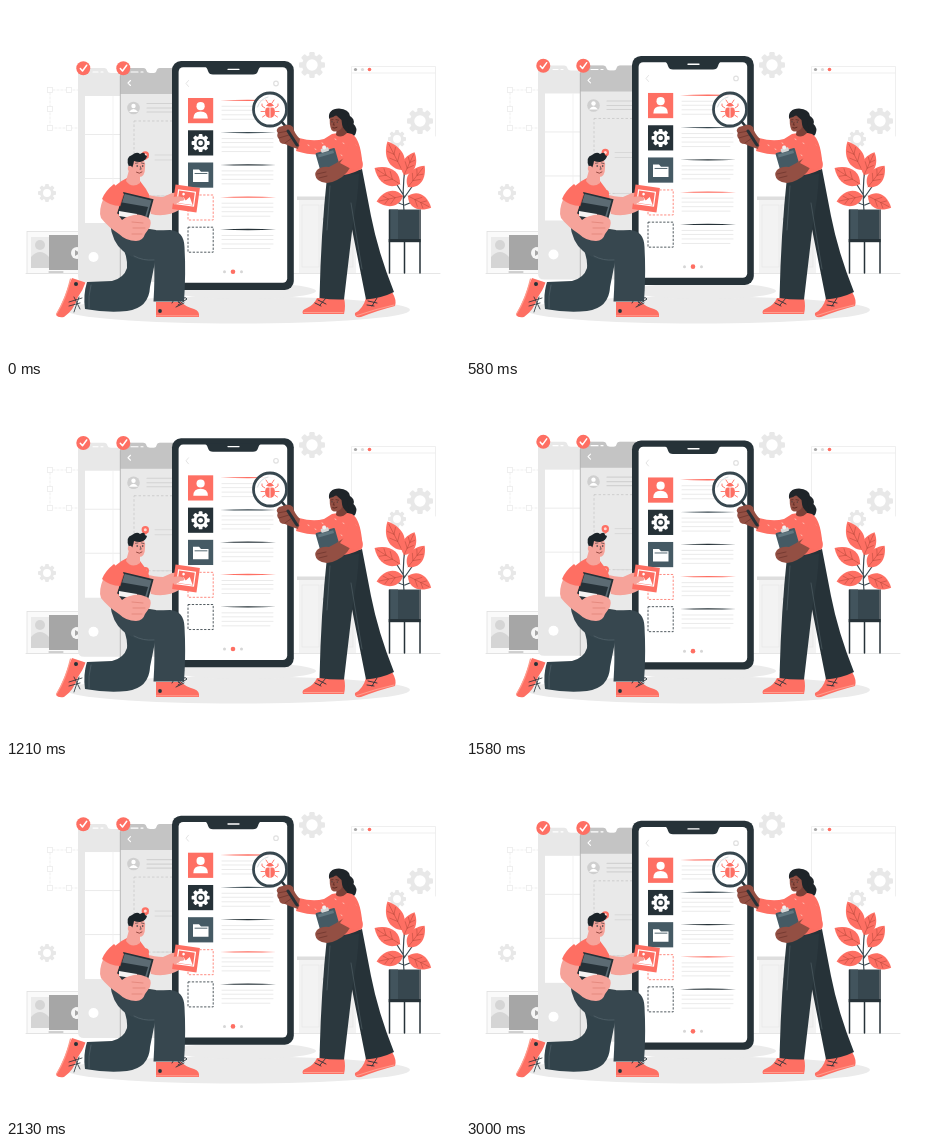
An HTML page that plays this animation: 454x352 px, repeating every 3.04 s.

```html
<!DOCTYPE html>
<html lang="en">
<head>
<meta charset="utf-8">
<title>App testing</title>
<style>
  html, body { margin: 0; width: 100%; height: 100%; overflow: hidden; background: #fff; }
  svg { display: block; width: 454px; height: 352px; }
  .line { fill: none; stroke-linecap: round; stroke-linejoin: round; }
</style>
</head>
<body>
<svg id="stage" viewBox="0 0 454 352" xmlns="http://www.w3.org/2000/svg"></svg>
<script>
const RED = '#fe6f63', DARK = '#263238', TEAL = '#455a64', PANTS = '#37474f';
const SKIN = '#f6a39a', BROWN = '#934f43', PALE = '#ebebeb', MID = '#e0e0e0';
const LOOP = 3040, TRAVEL = 6.6;

const path = (d, fill, extra = '') => `<path d="${d}" fill="${fill}" ${extra}/>`;
const line = (d, color, width = 1, extra = '') =>
  `<path class="line" d="${d}" stroke="${color}" stroke-width="${width}" ${extra}/>`;
const rect = (x, y, w, h, fill, extra = '') =>
  `<rect x="${x}" y="${y}" width="${w}" height="${h}" fill="${fill}" ${extra}/>`;
const dot = (x, y, r, fill, extra = '') => `<circle cx="${x}" cy="${y}" r="${r}" fill="${fill}" ${extra}/>`;
const oval = (x, y, rx, ry, fill, extra = '') =>
  `<ellipse cx="${x}" cy="${y}" rx="${rx}" ry="${ry}" fill="${fill}" ${extra}/>`;
const group = (content, extra = '') => `<g ${extra}>${content}</g>`;

function gear(x, y, r, fill, hole = '#fff') {
  let teeth = '';
  for (let a = 0; a < 360; a += 45)
    teeth += rect(x - r * .21, y - r, r * .42, r, fill, `rx="${r * .1}" transform="rotate(${a} ${x} ${y})"`);
  return teeth + dot(x, y, r * .77, fill) + dot(x, y, r * .44, hole);
}

function background() {
  const handles = [[44, 84], [63, 84], [44, 103], [44, 122], [63, 122]]
    .map(([x, y]) => rect(x - 2.5, y - 2.5, 5, 5, '#fff', `stroke="${PALE}" stroke-width=".8"`)).join('');
  return line('M73 84H44V122H73', PALE, .8, 'stroke-dasharray="2 2"') + handles
    + line('M345.5 130V60.5H429.5V130M345.5 67H429.5', PALE, .8)
    + gear(41, 187, 9, '#e8e8e8') + gear(306, 59, 13, '#e8e8e8')
    + gear(414, 115, 13, '#e8e8e8') + gear(391, 133, 9, '#e8e8e8')
    + dot(349.5, 63.5, 1.6, '#a6a6a6') + dot(356.5, 63.5, 1.6, '#dcdcdc') + dot(363.5, 63.5, 1.8, RED)
    + line('M20 267.5H434', MID, .8)
    + rect(21, 225.5, 54, 42, '#fafafa', `stroke="${MID}" stroke-width=".8"`)
    + rect(25, 231, 18, 31, PALE) + dot(34, 239, 5, '#d5d5d5') + path('M25 262V251Q34 241 43 251V262Z', '#d5d5d5')
    + rect(43, 229, 34, 35, '#a6a6a6') + dot(71, 247, 6, '#f5f5f5') + path('M69 244L74 247L69 250Z', '#a6a6a6')
    + line('M43 266H57', '#a6a6a6', 1)
    + rect(293, 194, 57, 73, '#f3f3f3') + rect(291, 190.5, 59, 3.5, '#dedede')
    + rect(296, 199, 17, 62, 'none', 'stroke="#e8e8e8" stroke-width=".8"')
    + rect(315, 199, 32, 62, '#f0f0f0', 'stroke="#e6e6e6" stroke-width=".8"') + dot(318, 213, 1.5, '#cfcfcf')
    + oval(232, 304, 172, 13.5, PALE) + oval(238, 285, 72, 8, PALE);
}

function badge(x) {
  return dot(x, 62.2, 7, RED) + line(`M${x - 3} 62.5L${x - .8} 65L${x + 3.4} 59.2`, '#fff', 1.5);
}

function panels() {
  const pin = (y) => path(`M139.5 ${y + 5}L136 ${y + 2}H143Z`, RED) + dot(139.3, y, 3.7, RED)
    + dot(139.3, y, 1.5, '#ffd9d2');
  return path('M72 68Q72 62 78 62H98Q101 62 101.5 65Q102 67 105 67H118V276H78Q72 276 72 270Z', '#e8e8e8')
    + line('M87 66H92M95 66H97', '#fff', 1.2)
    + rect(79, 90, 39, 127, '#fff') + line('M79 128.5H118M79 172.5H118', PALE, 1)
    + line('M107 90V217', '#f0f0f0', .8) + dot(87.5, 251, 5, '#fff')
    + path('M114 68Q114 62 120 62H137Q140 62 140.5 65Q141 67 144 67H148Q150 67 150.5 65Q151 62 154 62H170V276H114Z', '#e9e9e9')
    + path('M114 68Q114 62 120 62H137Q140 62 140.5 65Q141 67 144 67H148Q150 67 150.5 65Q151 62 154 62H170V88H114Z', '#c4c4c4')
    + line('M114.3 70V276', '#b3b3b3', .9)
    + line('M125 66H132M135 66H137', '#fff', 1.2) + line('M124.5 74.5L122 77L124.5 79.5', '#fff', 1.1)
    + dot(127.5, 102, 6.3, '#cfcfcf') + dot(127.5, 100, 2.2, '#fff') + path('M123 106Q127.5 100 132 106Z', '#fff')
    + line('M141 97.5H168M141 102H168M141 106H168', '#d2d2d2', 1.2)
    + rect(128, 115, 45, 75, 'none', 'stroke="#c8c8c8" stroke-width=".8" stroke-dasharray="2.5 2"')
    + line('M149 149H168M149 154H168M149 190H168', '#d8d8d8', 1)
    + pin(149) + pin(190) + badge(77.3) + badge(117.3);
}

function phone() {
  const icon = (y, fill, mark) => rect(182, y, 25.2, 25.2, fill) + mark;
  const slot = (y, color) =>
    rect(182, y, 25.2, 25, 'none', `stroke="${color}" stroke-width=".8" stroke-dasharray="2.3 1.5"`);
  const entry = (y, color) => path(`M214 ${y}Q242 ${y - 1.3} 270 ${y}Q242 ${y + 1.3} 214 ${y}Z`, color)
    + line(`M216 ${y + 6}H267M216 ${y + 10}H267M216 ${y + 14.5}H267M216 ${y + 19}H264`, '#e8e8e8', .9);
  const person = dot(194.6, 100.2, 4.1, '#fff') + path('M187.3 112.5Q187.3 105.4 194.6 105.4T201.9 112.5Z', '#fff');
  const folder = path('M187 163.5H193L195 165.8H202.5V176H187Z', '#fff') + line('M189 167.5H201', TEAL, .9);
  return rect(166, 55, 121.8, 229, DARK, 'rx="9"')
    + rect(172.6, 61.3, 108.6, 215.5, '#fff', 'rx="4.5"')
    + path('M198 60H256Q253 61 252 65Q251 68.5 247 68.5H207Q203 68.5 202 65Q201 61 198 60Z', DARK)
    + line('M222 63.3H233', '#fff', 1.3)
    + line('M182.5 74.5L180 77.5L182.5 80.5', MID, .9)
    + dot(270, 77.5, 2.3, 'none', `stroke="${MID}" stroke-width="1.2"`)
    + icon(92, RED, person) + icon(124.3, DARK, gear(194.6, 137, 9, '#fff', DARK) + dot(194.6, 137, 2.4, '#fff'))
    + icon(156.5, TEAL, folder)
    + slot(189, RED) + slot(221.2, DARK)
    + [RED, PANTS, DARK, RED, DARK].map((c, i) => entry(94.3 + i * 32.3, c)).join('')
    + dot(218.5, 265.7, 1.5, '#d6d6d6') + dot(227, 265.7, 2.3, RED) + dot(235.5, 265.7, 1.5, '#d6d6d6');
}

function man() {
  const photo = rect(-12.3, -12.3, 24.6, 24.6, RED)
    + rect(-8.5, -7.5, 17, 14, 'none', 'stroke="#fff" stroke-width="1.2"')
    + path('M-7.5 5.5L-2.5 -1L0 2L3.5 -2L7.5 5.5Z', '#fff') + dot(-3, -4, 1.3, '#fff');
  const shoes = path('M66 272L79.5 276.5Q77 284 72 291Q68 304 58 311Q52 312 50 309Q59 292 62 281Z', RED)
    + line('M64.5 273Q60 293 50.5 308', '#ff9c8e', 1.2) + dot(70, 278, 2, DARK)
    + line('M68 291L74 303M63 296L76 292M73 291L68 306M63 300L74 297', DARK, .8)
    + path('M150 296H175Q180 301 188 303Q194 305 193 311H150Z', RED)
    + line('M150.5 309.7H192', '#ff9c8e', 1.1) + dot(154, 305, 1.9, DARK)
    + line('M166 297Q170 288 173 297Q178 289 181 293L172 299M170 301L178 297', DARK, .9);
  const legs = path('M104 217L114 236Q122 250 121 262Q118 272 106 275L81 276Q77 289 79 303Q101 307 121 305Q143 302 144 281L151 246L150 224Z', '#32434b')
    + path('M104 217Q127 226 164 224Q178 225 178.5 241Q180 268 178 295.5H147.5Q149 272 148 254Q132 257 117 245Q106 236 104 217Z', PANTS)
    + line('M148 254Q137 255 128 250M85 279Q82 290 83 302', '#5a6b73', .6);
  const farArm = path('M139 188Q149 191 157 191L166 187Q174 185 181 190Q186 194 180 197Q185 198 183 201Q182 205 175 203Q160 212 145 208Z', SKIN);
  const torso = path('M121 172Q108 178 104 188Q98 207 101 217Q110 224 125 223L143 210Q147 193 140 183L134 175Z', RED);
  const head = path('M123 164L120 175Q126 183 134 177L134 168Z', SKIN)
    + path('M124 156Q125 150 133 151Q140 152 139 162Q139 171 133 171Q126 171 124 165Z', SKIN)
    + path('M123 161Q119 151 126 149Q131 145 134 148Q139 145 139 149L141 150Q140 155 134 156Q130 156 128 155Q127 162 124.5 163Z', '#1b2429')
    + oval(124, 162.5, 2.2, 2.8, SKIN)
    + dot(131.2, 160, .8, DARK) + dot(136.7, 160, .8, DARK)
    + line('M129.5 157.3L132 156.9M135.5 157L138 157.6M134.3 160.5L135.2 163.2H134', DARK, .6)
    + line('M130.5 166.3Q133.5 168.5 136 166', '#7e342d', .8);
  const books = path('M118 187L146.5 194L141 214L112 207Z', '#5c6b73', `stroke="${DARK}" stroke-width="1.8"`)
    + path('M113.5 196L142 201L137 218L113 214Z', DARK)
    + path('M113 205L131 208L131 213L113 210Z', '#f3f3f3');
  const nearArm = path('M98 191Q92 205 95 212Q102 221 113 228Q120 235 130 235Q137 235 139 228L144 221Q147 212 138 210Q132 207 124 210Q119 211 116 214L111 207L114 198Z', SKIN)
    + line('M126 216L137 217M127 222L139 222M126 228L136 228', '#df7f73', .7)
    + path('M108 178Q99 185 96 193Q104 200 114 200L118 188Z', RED)
    + line('M114 200L117 190', '#d95746', .6);
  return shoes + legs + farArm + torso + head + books + nearArm
    + group(photo, 'transform="translate(180 192.5) rotate(8)"')
    + path('M163 193Q171 188 178 192Q180 195 174 195L169 199Z', SKIN);
}

function bug() {
  return line('M259 102L256 100V98M258.5 105.5H255M259.5 109L256.5 111M269 102L272 100V98M269.5 105.5H273M268.5 109L271.5 111M262 97L260 94M266 97L268 94', RED, .9)
    + path('M260 100Q264 93.5 268 100Z', RED) + oval(264, 106, 5, 6, RED)
    + line('M264 101V111.5M259.5 101.2H268.5', '#fff', .8);
}

function woman() {
  const specks = [[302, 139], [309, 143], [316, 137], [323, 143], [329, 133], [337, 137], [343, 145],
    [335, 149], [349, 139], [351, 151], [344, 157], [339, 163], [315, 146], [350, 158]]
    .map(([x, y]) => line(`M${x} ${y}l1 .5`, '#ffc3b8', 1)).join('');
  const shoes = path('M311 292H338Q340 300 338 308H297Q295 304 301 302Q308 299 311 292Z', RED)
    + path('M360 292L386 286Q391 294 389 300Q373 304 355 311Q348 312 349 307Q357 303 360 292Z', RED)
    + line('M298 306.5H337M351 309.5Q370 303 388 299', '#ff9c8e', 1.1)
    + line('M309 297L315 300M312 294L320 298M314 299L320 292M361 299L368 300M362 295L371 297M366 300L371 292', DARK, .9);
  const legs = path('M337 168L356 163Q360 184 365 210Q372 246 388 286Q376 292 360 293.5L342 203Z', DARK)
    + path('M321 171Q331 169 353 168Q352 193 347 217L338 293.5Q326 294 313.5 292Q315 226 321 171Z', '#2b383e')
    + line('M345 197Q349 222 356 263M324 180L321 224', '#54646b', .6);
  const shirt = path('M326 128Q338 125 346 128Q354 133 356 154Q358 160 355.5 163Q342 170 329 170L323 168L319 148Q306 150 290 145L293 132Q307 136 318 133Z', RED);
  const hair = path('M323 112Q322 103 333 102.5Q343 103 344 110Q349 113 347.5 118Q352 122 349.5 128Q347 133 341 130Q335 133 333 126Z', '#1f2529');
  const face = path('M331 120L330 129Q335 133 341 127L338 117Z', '#7c4037')
    + path('M324 110Q323 119 325.5 124Q329 127.5 335 123Q339 117 336 109Z', BROWN)
    + path('M323.5 112Q325 103 334 104Q343 108 342 126Q336 124 335.5 114Q332 111 330 109Q327 112 323.5 112Z', '#1f2529')
    + dot(326, 115.8, .6, DARK) + dot(331.3, 116, .6, DARK)
    + line('M325 114L327 113.6M330 113.6L332.6 114.2M328 116.5L327.2 119H328.6', '#4d211b', .6)
    + line('M326.8 121.8Q328.7 122.8 331 121.3', '#4d211b', .8);
  const board = rect(-10, -11, 20, 25, TEAL, 'rx="1"') + rect(-8, -9, 16, 3, '#607780')
    + rect(-4, -13.5, 8, 4, '#d8d8d8', 'rx="1"') + dot(0, -14, 2, '#f2f2f2');
  const lowerArm = path('M347 155Q343 168 331 174Q320 180 312 174Q307 169 311 164Q316 160 323 161Q331 157 338 152Z', BROWN)
    + line('M311 168L320 166M313 172L321 170', '#6a332b', .7)
    + path('M344 134Q354 139 356 156Q355 163 347 164L334 157L340 148Z', RED);
  const glass = dot(264, 103.5, 16.5, '#fff', `fill-opacity=".86" stroke="${PANTS}" stroke-width="2.8"`)
    + line('M251.5 101Q254 93 262 91', '#d5dcdf', 1) + bug()
    + line('M276 116L280 121', DARK, 2.5) + line('M280 121L291 139', DARK, 4.4);
  const hand = path('M294 133Q288 127 287 121Q284 118 280 119L273 121Q269 124 272 127Q270 130 273 133Q273 138 279 138Q285 141 292 143Z', BROWN)
    + line('M272 127L282 125M273 132L283 129M279 137L286 132', '#6a332b', .7)
    + line('M282 125L291 139', DARK, 3);
  return shoes + legs + hair + shirt + face + specks
    + group(board, 'transform="translate(322 155) rotate(-16)"') + lowerArm
    + glass + hand;
}

function plant() {
  const leaf = (x, y, angle, length, width) => group(
    path(`M0 0C${width} ${-length * .2} ${width} ${-length * .65} 0 ${-length}C${-width} ${-length * .65} ${-width} ${-length * .2} 0 0Z`, RED)
    + line(`M0 0V${-length * .9}M0 ${-length * .3}L${width * .5} ${-length * .5}M0 ${-length * .3}L${-width * .5} ${-length * .5}M0 ${-length * .55}L${width * .4} ${-length * .72}M0 ${-length * .55}L${-width * .4} ${-length * .72}`, '#b84a3d', .5),
    `transform="translate(${x} ${y}) rotate(${angle})"`);
  return line('M398 205Q396 185 399 162M398 190L388 174M398 192L410 175M398 199Q391 197 388 193M399 199L406 196', PANTS, 1.2)
    + leaf(396, 164, -27, 32, 11) + leaf(398, 169, 25, 25, 9)
    + leaf(394, 178, -58, 30, 11) + leaf(402, 181, 38, 27, 10)
    + leaf(397, 190, -102, 27, 10) + leaf(402, 190, 117, 26, 10)
    + rect(384, 203.5, 29, 32, PANTS) + rect(384, 203.5, 8, 32, '#42545d')
    + line('M383.5 204V267M414 204V267M398.5 236V267', DARK, 1.5) + rect(382.7, 233, 32, 3.2, DARK);
}

const stage = document.getElementById('stage');
stage.innerHTML = background() + group(panels(), 'id="panels"')
  + group(phone(), 'id="phone"') + plant() + man() + woman();
const panelLayer = document.getElementById('panels');
const phoneLayer = document.getElementById('phone');

// Linear rise and fall: 0 at the ends of a period, -TRAVEL halfway.
const floating = (time, period) => {
  const phase = (time % period) / period;
  return -TRAVEL * (1 - Math.abs(1 - 2 * phase));
};

function draw(time) {
  panelLayer.setAttribute('transform', `translate(0 ${floating(time, LOOP)})`);
  phoneLayer.setAttribute('transform', `translate(0 ${floating(time, LOOP / 2)})`);
}

const start = performance.now();
function tick() {
  draw(performance.now() - start);
  requestAnimationFrame(tick);
}
draw(0);
requestAnimationFrame(tick);
</script>
</body>
</html>
```
